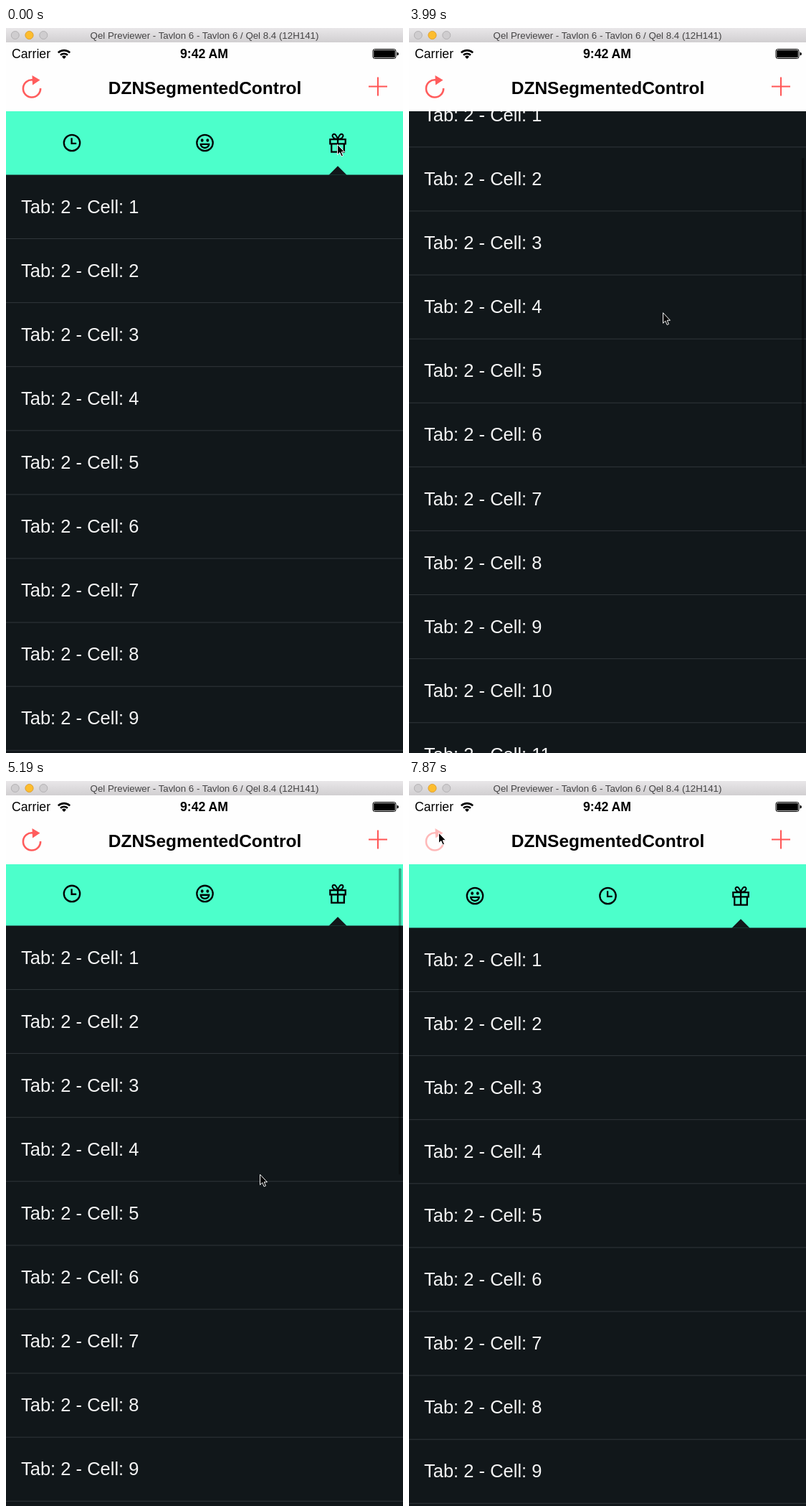
Animation, 554 px wide and 1010 px high, one loop 8 s. Source, as an HTML page:

```html
<!DOCTYPE html>
<html lang="en">
<head>
<meta charset="utf-8">
<title>Segmented control</title>
<style>
  html, body { margin: 0; width: 100%; height: 100%; overflow: hidden; background: #11171a; }
  svg { display: block; width: 100%; height: 100%; font-family: "Liberation Sans", Arial, sans-serif; }
  .icon { fill: none; stroke: #000; stroke-width: 2.3; }
  .cell { font-size: 25.5px; fill: #f4f4f4; }
</style>
</head>
<body>
<svg viewBox="0 0 554 1010">
  <defs>
    <linearGradient id="chrome" x2="0" y2="1">
      <stop stop-color="#e9e7e9"/><stop offset="1" stop-color="#d1cfd1"/>
    </linearGradient>
    <clipPath id="view"><path d="M0 116H554V1010H0Z"/></clipPath>
  </defs>

  <rect width="554" height="1010" fill="#11171a"/>
  <g clip-path="url(#view)">
    <g id="content">
      <path d="M0 115H554V204.5H0Z" fill="#4cffcb"/>
      <g id="clock" class="icon">
        <circle r="11.2"/><path d="M-.4 -6.8V.8H6.2"/>
      </g>
      <g id="smiley" class="icon">
        <circle r="11.2"/>
        <path d="M-5.8 1.8H5.8A5.8 5.2 0 0 1 -5.8 1.8Z"/>
        <g fill="#000" stroke="none">
          <ellipse cx="-3.8" cy="-3.5" rx="1.9" ry="2.3"/><ellipse cx="3.8" cy="-3.5" rx="1.9" ry="2.3"/>
        </g>
      </g>
      <g id="gift" class="icon">
        <path d="M-10.7 -4.9H10.7V1.3H-10.7ZM-8.8 1.3V12.6H8.8V1.3M0 -4.9V12.6"/>
        <path d="M0 -5C-2 -11 -4 -13 -6.3 -12C-9 -10.5 -7 -5 0 -5C7 -5 9 -10.5 6.3 -12C4 -13 2 -11 0 -5" stroke-width="2"/>
      </g>
      <path id="pointer" d="M-12.5 204.8L0 192.3L12.5 204.8Z" fill="#11171a"/>
      <g id="rows"></g>
    </g>
    <rect id="bar" x="548" width="3.6" height="427" rx="1.8" fill-opacity=".35"/>
  </g>

  <rect y="20" width="554" height="96" fill="#fefefe"/>
  <rect width="554" height="20" fill="url(#chrome)"/>
  <g fill="#cfcdcf" stroke="#b4b2b4">
    <circle cx="12.8" cy="10" r="5.5"/><circle cx="52.3" cy="10" r="5.5"/>
    <circle cx="32.5" cy="10" r="5.6" fill="#fdbd2e" stroke="#e0a030"/>
  </g>
  <text x="277" y="15" text-anchor="middle" font-size="13.3" fill="#454445">Qel Previewer - Tavlon 6 - Tavlon 6 / Qel 8.4 (12H141)</text>

  <text x="8" y="42" font-size="17.7">Carrier</text>
  <g fill="none" stroke="#000" stroke-width="2.6">
    <path d="M72.8 34.4A11.8 11.8 0 0 1 89.2 34.4M76 37.8A7.2 7.2 0 0 1 86 37.8"/>
    <path d="M81 43L78 39.9A4.3 4.3 0 0 1 84 39.9Z" fill="#000" stroke="none"/>
  </g>
  <text x="276.5" y="42" text-anchor="middle" font-size="17.7" font-weight="700">9:42 AM</text>
  <rect x="512" y="29.5" width="32" height="13" rx="2.5" fill="none" stroke="#000"/>
  <rect x="513.2" y="30.7" width="29.6" height="10.6" rx="1.3"/>
  <path d="M545.5 33.5Q548 34 548 36T545.5 38.5Z"/>

  <text x="277.5" y="92" text-anchor="middle" font-size="24.5" font-weight="700">DZNSegmentedControl</text>
  <g id="refresh">
    <path d="M37.5 72.4A12.1 12.1 0 1 0 48.1 84" fill="none" stroke="#ff5c5c" stroke-width="2.6"/>
    <path d="M36.5 66L47.5 72.5L37 79.5Z" fill="#ff5c5c"/>
  </g>
  <path d="M506 81.5H532M519 68.5V94.5" stroke="#ff5555" stroke-width="2"/>

  <g id="cursor">
    <path d="M.6 .2V16.3L4.2 12.8L6.8 18.8L9.4 17.7L6.9 11.9H11.6Z" transform="scale(.9)" stroke="#fff" stroke-width="1.1"/>
  </g>
</svg>
<script>
const LOOP = 8000, ROW = 89.1, ROWS = 20, REST_Y = 551;
const [LEFT, MIDDLE, RIGHT] = [92, 277.5, 463];
const COLUMNS = [LEFT, MIDDLE, RIGHT];

const stepAt = t => Math.min(53, Math.floor((t + 18) / 148));
const DRAG = { start: 24, peak: 29, end: 38, height: 197 };
const PRESS = 51, SHUFFLE = 52;
const taps = [{ at: 7, tab: 0 }, { at: 12, tab: 1 }, { at: 17, tab: 2 }];
const moves = [
  { from: 2, to: 5, x: 88, y: 163 },
  { from: 9, to: 12, x: 279, y: 162 },
  { from: 13, to: 14.2, x: 441, y: 160 },
  { from: 18, to: 22, x: 354, y: REST_Y },
  { from: 38, to: 43, x: 284, y: 188 },
  { from: 44, to: 49, x: 41, y: 72 }
];

const $ = id => document.getElementById(id);
const place = (id, x, y) => $(id).setAttribute("transform", `translate(${x} ${y})`);
const mix = (a, b, p) => a + (b - a) * p;

function ease(p) {
  p = Math.max(0, Math.min(1, p));
  return p * p * (3 - 2 * p);
}

// The list is pulled up, then let back down with a long tail.
function scrollAt(step) {
  const { start, peak, end, height } = DRAG;
  if (step < peak) return height * ease((step - start) / (peak - start));
  return height * Math.pow(Math.max(0, (end - step) / (end - peak)), 3.8);
}

function cursorAt(step) {
  let x = 462, y = 162;
  for (const m of moves) {
    const p = ease((step - m.from) / (m.to - m.from));
    x = mix(x, m.x, p);
    y = mix(y, m.y, p);
  }
  // While pulling up, the cursor runs half a step ahead of the list.
  const drag = step > DRAG.start ? Math.max(scrollAt(step), scrollAt(step + 0.5)) : 0;
  return [x, y - drag];
}

const pointerAt = step =>
  taps.reduce((x, tap) => mix(x, COLUMNS[tap.tab], ease((step - tap.at + 0.6) / 1.4)), RIGHT);
const tabAt = step => taps.reduce((tab, tap) => step >= tap.at ? tap.tab : tab, 2);
const refreshAlpha = step => step < PRESS ? 1 : 0.2 + 0.22 * Math.max(0, step - SHUFFLE);

function buildRows() {
  let html = "";
  for (let i = 0; i < ROWS; i++) {
    const y = ROW * i;
    html += `<text class="cell" x="21" y="${257.6 + y}">Tab: <tspan class="tab">2</tspan> - Cell: ${i + 1}</text>` +
      `<path d="M0 ${293.5 + y}H554" stroke="#30363a"/>`;
  }
  $("rows").innerHTML = html;
}

buildRows();
const tabLabels = document.querySelectorAll(".tab");

function render(t) {
  const step = stepAt(t), scroll = scrollAt(step), tab = tabAt(step);
  const shuffled = step >= SHUFFLE;
  tabLabels.forEach(label => label.textContent = tab);
  place("content", 0, -scroll);
  place("pointer", pointerAt(step), 0);
  place("clock", shuffled ? MIDDLE : LEFT, 160);
  place("smiley", shuffled ? LEFT : MIDDLE, 160);
  place("gift", RIGHT, 160);
  place("cursor", ...cursorAt(step));
  $("bar").setAttribute("y", 120 + scroll * 0.478);
  $("bar").setAttribute("opacity", step > DRAG.start && step <= DRAG.end ? 1 : 0);
  $("refresh").setAttribute("opacity", refreshAlpha(step));
}

const start = performance.now();
function tick() {
  render((performance.now() - start) % LOOP);
  requestAnimationFrame(tick);
}
tick();
</script>
</body>
</html>
```
